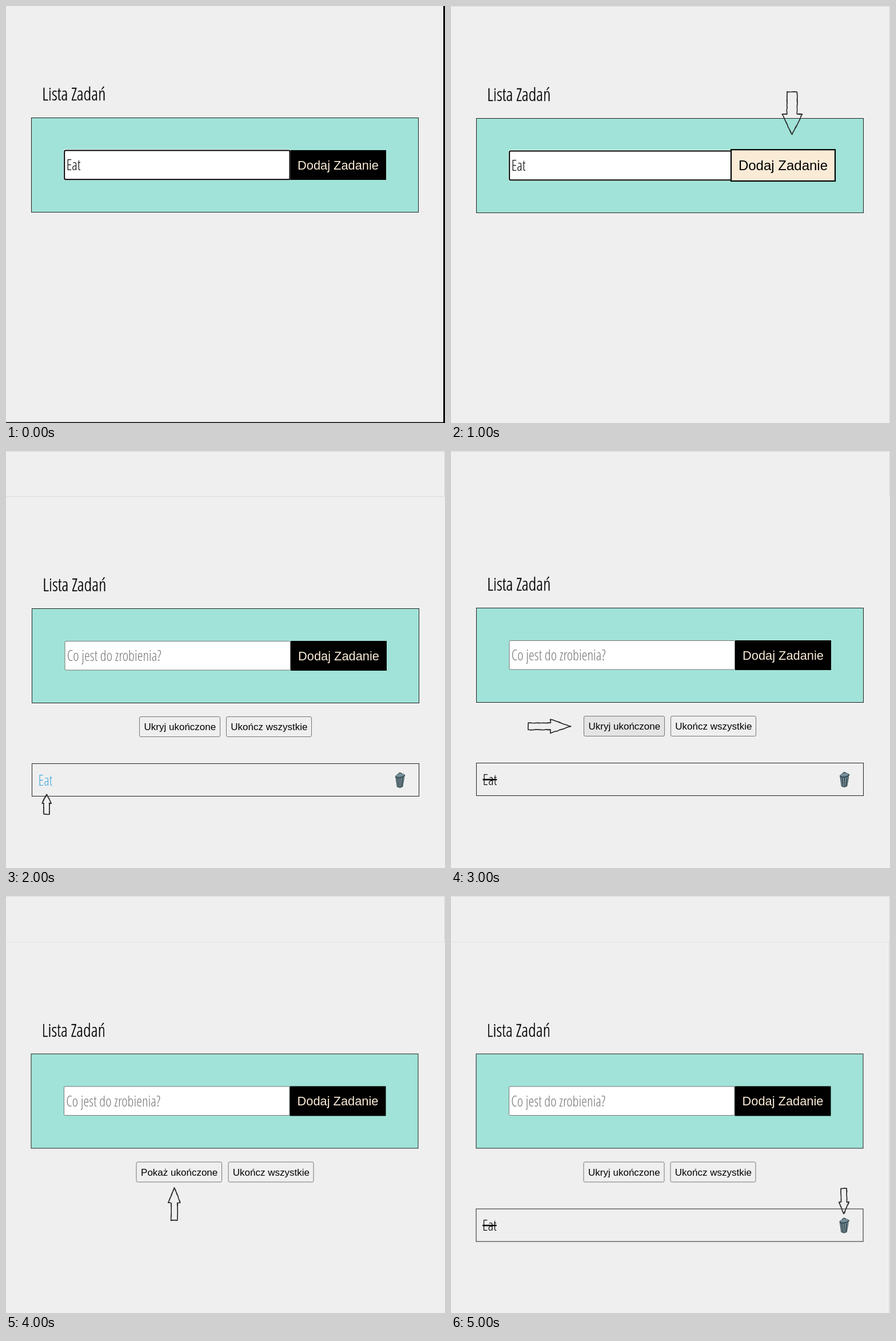
Recreate the animation shown at these times as an HTML page. Size 768 px wide and 729 px high, loop 6000 ms.

```html
<!DOCTYPE html>
<html lang="pl">
<head>
<meta charset="utf-8">
<title>Lista Zadań</title>
<style>
  html, body { margin: 0; width: 100%; height: 100%; overflow: hidden; background: #efefef; }
  svg { display: block; width: 768px; height: 729px; }
  text { white-space: pre; }
  .cond {
    font-family: "Open Sans Condensed Light", "Open Sans", sans-serif;
    font-stretch: 75%;
    font-variation-settings: "wdth" 75, "wght" 300;
    font-weight: 300;
    font-size: 25px;
  }
  .title { font-size: 31px; stroke: #000; stroke-width: .3px; }
  .struck { text-decoration: line-through; }
  .button { font-family: "Liberation Sans", Arial, sans-serif; text-anchor: middle; }
</style>
</head>
<body>
<svg id="stage" viewBox="0 0 768 729" xmlns="http://www.w3.org/2000/svg"></svg>
<script>
const STEP = 1000;
const CREAM = '#faebd7';

const rect = (x, y, w, h, fill, stroke = 'none', width = 1, rx = 0) =>
  `<rect x="${x}" y="${y}" width="${w}" height="${h}" rx="${rx}" fill="${fill}" stroke="${stroke}" stroke-width="${width}"/>`;

const label = (x, y, text, cls, fill = '#000', size = '') =>
  `<text x="${x}" y="${y}" class="${cls}" fill="${fill}"${size && ` style="font-size:${size}px"`}>${text}</text>`;

function seeded(seed) {
  return () => (seed = (seed * 16807) % 2147483647) / 2147483647;
}

// Pencil-like outline; angle 0 points right, (x, y) is the tip.
function arrow([x, y, angle, length, head, headWidth, shaft]) {
  const random = seeded(91);
  const corners = [
    [0, 0], [-head, -headWidth / 2], [-head, -shaft / 2], [-length, -shaft / 2],
    [-length, shaft / 2], [-head, shaft / 2], [-head, headWidth / 2], [0, 0]
  ];
  const jitter = v => (v + (random() - 0.5) * 1.1).toFixed(1);
  const stroke = () => {
    let path = `M${corners[0]}`;
    for (let i = 1; i < corners.length; i++) {
      const [ax, ay] = corners[i - 1], [bx, by] = corners[i];
      const pieces = Math.max(2, Math.round(Math.hypot(bx - ax, by - ay) / 4));
      for (let k = 1; k <= pieces; k++) {
        const t = k / pieces;
        path += `L${jitter(ax + (bx - ax) * t)} ${jitter(ay + (by - ay) * t)}`;
      }
    }
    return `<path d="${path}"/>`;
  };
  return `<g transform="translate(${x} ${y}) rotate(${angle})" fill="none" stroke="#2b2b2b"
    stroke-width="1.3" stroke-linejoin="round">${stroke()}${stroke()}</g>`;
}

const emptyField = rect(102, 252.5, 394.5, 50.5, '#fff', '#767676', 1, 2) +
  label(105.7, 287, 'Co jest do zrobienia?', 'cond', '#757575');

const focusedField = rect(100.5, 250.5, 397, 54, '#fff', 'none', 0, 3) +
  rect(102.2, 252.5, 394.3, 50.8, '#fff', '#000', 2, 2) +
  label(105.7, 287, 'Eat', 'cond');

const addButton = rect(497, 252, 168, 52, '#000') +
  label(581, 285.5, 'Dodaj Zadanie', 'button', CREAM, 21.8);

const hoveredButton = rect(490, 250.2, 182, 54.8, CREAM, '#000', 2.2) +
  label(581, 286, 'Dodaj Zadanie', 'button', '#000', 24);

const smallButton = (x, width, text, fill = '#efefef') =>
  rect(x, 384.5, width, 35, fill, '#767676', 1, 2.5) +
  label(x + width / 2 + 0.4, 408, text, 'button', '#000', 17);

const bin = `<g stroke-linejoin="round" stroke-linecap="round">
  <path d="M681 491L683.3 507Q688 510 692.7 507L695.5 491Z" fill="#6b8792" stroke="#35474f"/>
  <path d="M684.5 493L686 506.5M688.3 493V507.5M692.2 493L690.8 506.5" stroke="#263238" stroke-width="1.3"/>
  <path d="M686.3 493L687 507M690.3 493L689.3 507" stroke="#a2b5bd" stroke-width=".8"/>
  <g transform="rotate(-9 688.5 487.5)">
    <ellipse cx="688.5" cy="488.3" rx="8.3" ry="3.2" fill="#455a64" stroke="#35474f"/>
    <ellipse cx="688.5" cy="486.6" rx="7.4" ry="3" fill="#78909c"/>
    <path d="M685.7 484.5Q688.5 481 691.4 484.5" fill="none" stroke="#37474f" stroke-width="1.4"/>
  </g></g>`;

const item = (color, cls) =>
  rect(44.5, 466.5, 677, 57, 'none', '#222') + label(55.6, 504.5, 'Eat', cls, color) + bin;

const hline = (y, color = '#dcdcdc') => rect(0, y, 768, 1, color);
const vline = (x, y, height) => rect(x, y, 1, height, '#d4d4d4');

const pending = item('#42a9dc', 'cond');
const done = item('#000', 'cond struck');
const emptyForm = emptyField + addButton;
const completeAll = x => smallButton(x, 149, 'Ukończ wszystkie');
const hide = fill => smallButton(232.5, 141, 'Ukryj ukończone', fill) + completeAll(384.5);
const show = smallButton(228.5, 149.5, 'Pokaż ukończone') + completeAll(389.5);
const header = hline(0) + hline(80, '#e3e3e3') + vline(767, 0, 80);

const scenes = [
  { at: [0, 0], content: addButton + focusedField,
    edges: rect(765, 0, 3, 729, '#000') + rect(0, 727.5, 768, 1.5, '#000') },
  { at: [0, 1], content: focusedField + hoveredButton,
    edges: hline(0) + vline(767, 0, 729), pointer: [596.7, 225, 90, 75, 36, 35, 18] },
  { at: [1, 80], content: emptyForm + hide() + pending,
    edges: hline(0) + hline(79) + vline(767, 0, 79), pointer: [71, 600, -90, 35, 16, 16, 10] },
  { at: [0, 79], content: emptyForm + hide('#e4e4e4') + done,
    edges: hline(0) + vline(767, 0, 80), pointer: [210, 481.3, 0, 75, 36, 24, 12] },
  { at: [-0.5, 80.5], content: emptyForm + show,
    edges: header, pointer: [294.5, 509.5, -90, 57.5, 27, 21, 11] },
  { at: [-0.5, 80.5], content: emptyForm + hide() + done,
    edges: header + vline(766, 80, 649), pointer: [687.3, 556, 90, 45, 21, 17.5, 10] }
];

const draw = ({ at, content, edges, pointer }) => `<g visibility="hidden">${edges}
  <g transform="translate(${at})">
    ${label(63.3, 165, 'Lista Zadań', 'cond title')}
    ${rect(44.5, 195.5, 677, 165, '#a1e3d8', '#222')}
    ${content}
  </g>${pointer ? arrow(pointer) : ''}</g>`;

const stage = document.getElementById('stage');
stage.innerHTML = scenes.map(draw).join('');
const layers = [...stage.children];
const start = performance.now();

function render(now) {
  const current = Math.floor(Math.max(0, now - start) / STEP) % layers.length;
  layers.forEach((layer, i) => layer.setAttribute('visibility', i === current ? 'visible' : 'hidden'));
  requestAnimationFrame(render);
}
render(start);
</script>
</body>
</html>
```
